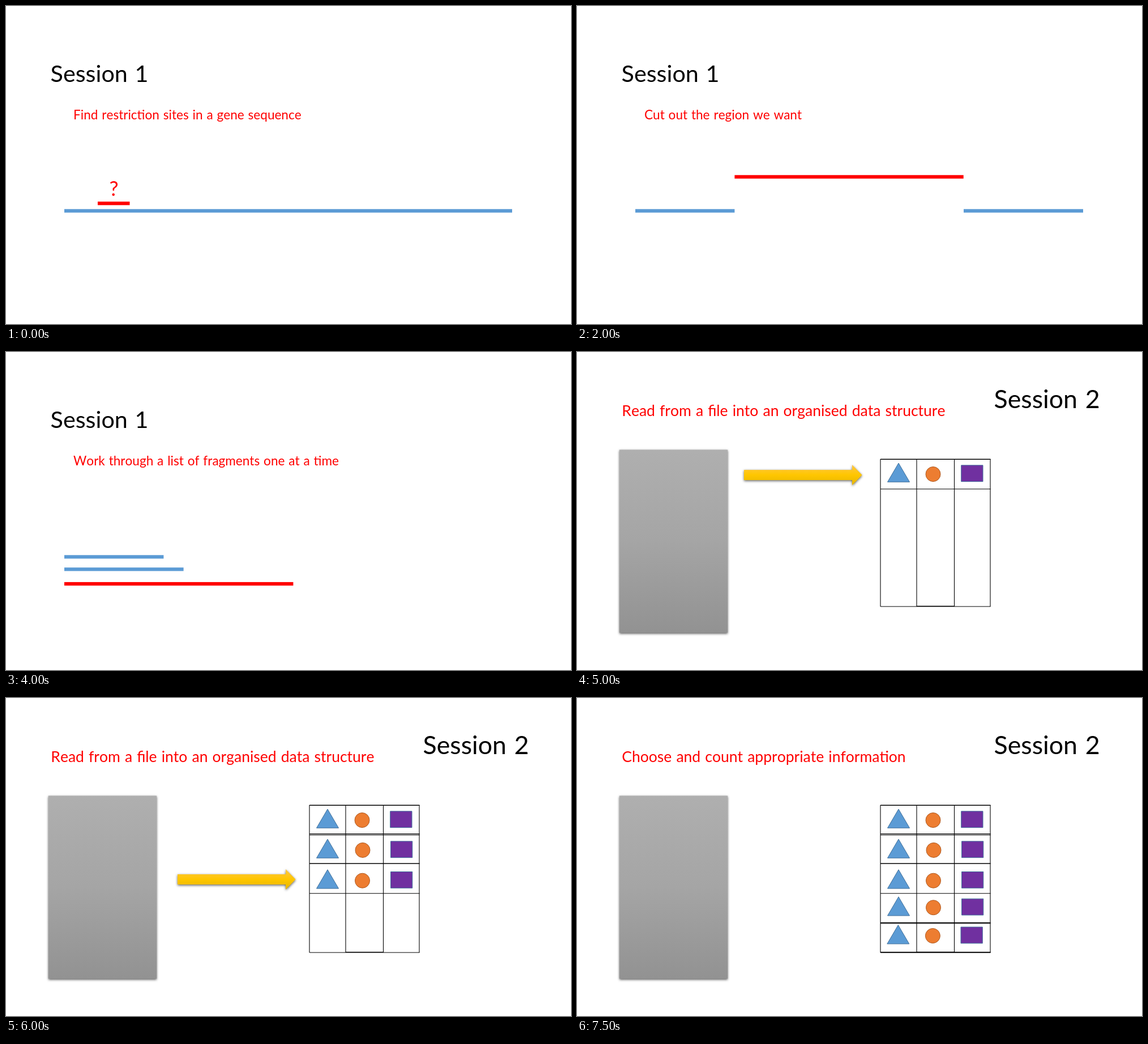
An HTML page with a canvas for the animation above (8 s loop, 998 by 561 pixels).

```html
<!DOCTYPE html>
<html lang="en">
<head>
<meta charset="utf-8">
<title>Course sessions</title>
<style>
html, body { margin: 0; width: 100%; height: 100%; overflow: hidden; background: #fff; }
canvas { display: block; width: 998px; height: 561px; }
</style>
</head>
<body>
<canvas id="stage" width="998" height="561"></canvas>
<script>
const ctx = document.getElementById('stage').getContext('2d');
const RED = '#ff0000', BLUE = '#5b9bd5';
const STEP = 500, STEPS = 16;

function text(str, x, y, size, color = RED) {
  ctx.font = `${size}px Lato, Carlito, sans-serif`;
  ctx.fontKerning = 'none';
  ctx.wordSpacing = size * 0.05 + 'px';
  ctx.fillStyle = color;
  ctx.fillText(str, x, y);
}

function bar(x1, x2, y, color) {
  ctx.fillStyle = color;
  ctx.fillRect(x1, y - 3.1, x2 - x1, 6.2);
}

function line(x1, y1, x2, y2, width = 1.1) {
  ctx.strokeStyle = '#000';
  ctx.lineWidth = width;
  ctx.beginPath();
  ctx.moveTo(x1, y1);
  ctx.lineTo(x2, y2);
  ctx.stroke();
}

function paint(fill, stroke) {
  ctx.fillStyle = fill;
  ctx.strokeStyle = stroke;
  ctx.lineWidth = 1;
  ctx.fill();
  ctx.stroke();
}

function gradient(y1, y2, ...colors) {
  const g = ctx.createLinearGradient(0, y1, 0, y2);
  colors.forEach((c, i) => g.addColorStop(i / (colors.length - 1), c));
  return g;
}

function shadowed(fill) {
  ctx.save();
  ctx.shadowColor = 'rgba(0,0,0,.63)';
  ctx.shadowBlur = 4;
  ctx.shadowOffsetY = 1.5;
  ctx.fillStyle = fill;
  ctx.fill();
  ctx.restore();
}

function arrow(x, y) {
  ctx.beginPath();
  ctx.moveTo(x, y - 9);
  ctx.lineTo(x + 191, y - 9);
  ctx.lineTo(x + 191, y - 18);
  ctx.lineTo(x + 208.5, y);
  ctx.lineTo(x + 191, y + 18);
  ctx.lineTo(x + 191, y + 9);
  ctx.lineTo(x, y + 9);
  ctx.closePath();
  shadowed(gradient(y - 18, y + 18, '#ffc746', '#ffc600', '#e5b600'));
}

// Each row: triangle top, circle centre, rectangle top, then the x positions.
const rows = [
  { tri: 196, cy: 215.5, box: 199.8, triX: 568, cx: 629, boxX: 678.7 },
  { tri: 249, cy: 268.4, box: 252.8, triX: 568, cx: 630, boxX: 679.5 },
  { tri: 302.8, cy: 322.2, box: 306.5, triX: 568, cx: 629.5, boxX: 679.5 },
  { tri: 350.7, cy: 369.7, box: 354.2, triX: 568, cx: 629.5, boxX: 679.5 },
  { tri: 400.5, cy: 419.5, box: 404, triX: 567.3, cx: 628.4, boxX: 678 }
];

function shapes({ tri, cy, box, triX, cx, boxX }) {
  ctx.beginPath();
  ctx.moveTo(triX, tri);
  ctx.lineTo(triX + 19.5, tri + 33.3);
  ctx.lineTo(triX - 19.5, tri + 33.3);
  ctx.closePath();
  paint(BLUE, '#41719c');
  ctx.beginPath();
  ctx.arc(cx, cy, 13, 0, 7);
  paint('#ed7d31', '#ae5a21');
  ctx.beginPath();
  ctx.rect(boxX, box, 38.3, 28.8);
  paint('#7030a0', '#41719c');
}

function table(count) {
  const rule = (y, w) => line(536, y, 730.5, y, w);
  for (const x of [536, 600, 666.5, 730]) line(x, 189, x, 449);
  rule(189.3, 1.6);
  rule(241.7);
  if (count > 1) { rule(239.6); rule(292, count > 2 ? 1.6 : 1.1); }
  if (count > 2) rule(344.8);
  if (count > 3) rule(397.8);
  if (count > 4) rule(396.4);
  rule(449);
  line(600, 448.4, 666.5, 448.4, 1.3);
  if (count > 4) rule(448.6, 1.6);
  rows.slice(0, count).forEach(shapes);
}

function cutting(step) {
  text('Session 1', 78.5, 134, 41.3, '#000');
  const title = step < 3 ? 'Find restriction sites in a gene sequence'
    : step < 6 ? 'Cut out the region we want'
    : 'Work through a list of fragments one at a time';
  text(title, 119, 200, 22.55);
  if (step < 4) {
    bar(103, 894, 361.4, BLUE);
    if (step < 3) {
      const x = [162, 322.4, 650.4][step];
      bar(x, x + 56.5, 348.2, RED);
      text('?', x + 20.5, 335, 36);
    }
  } else if (step < 6) {
    bar(103, 278.4, 361.4, BLUE);
    bar(683, 894, 361.4, BLUE);
    bar(278.4, 682.7, 301.4, RED);
  } else {
    const active = Math.min(step - 6, 2);
    [[278.4, 361.4], [313.6, 383.3], [507.4, 409]].forEach(([end, y], i) =>
      bar(103, end, y, i === active ? RED : BLUE));
  }
}

function reading(step) {
  text('Session 2', 736.5, 99, 44.7, '#000');
  text(step < 5 ? 'Read from a file into an organised data structure'
    : 'Choose and count appropriate information', 79.3, 112.5, 26.5);
  ctx.beginPath();
  ctx.rect(74.8, 172.4, 191.4, 322.8);
  shadowed(gradient(172, 495, '#afafaf', '#a5a5a5', '#929292'));
  table(Math.min(step + 1, 5));
  if (step < 5) arrow(step < 2 ? 295 : 303, [217, 268.4, 320, 371.5, 420.5][step]);
}

function draw(now) {
  const step = Math.floor(now / STEP) % STEPS;
  ctx.fillStyle = '#fff';
  ctx.fillRect(0, 0, 998, 561);
  if (step < 10) cutting(step);
  else reading(step - 10);
  requestAnimationFrame(draw);
}
requestAnimationFrame(draw);
</script>
</body>
</html>
```
